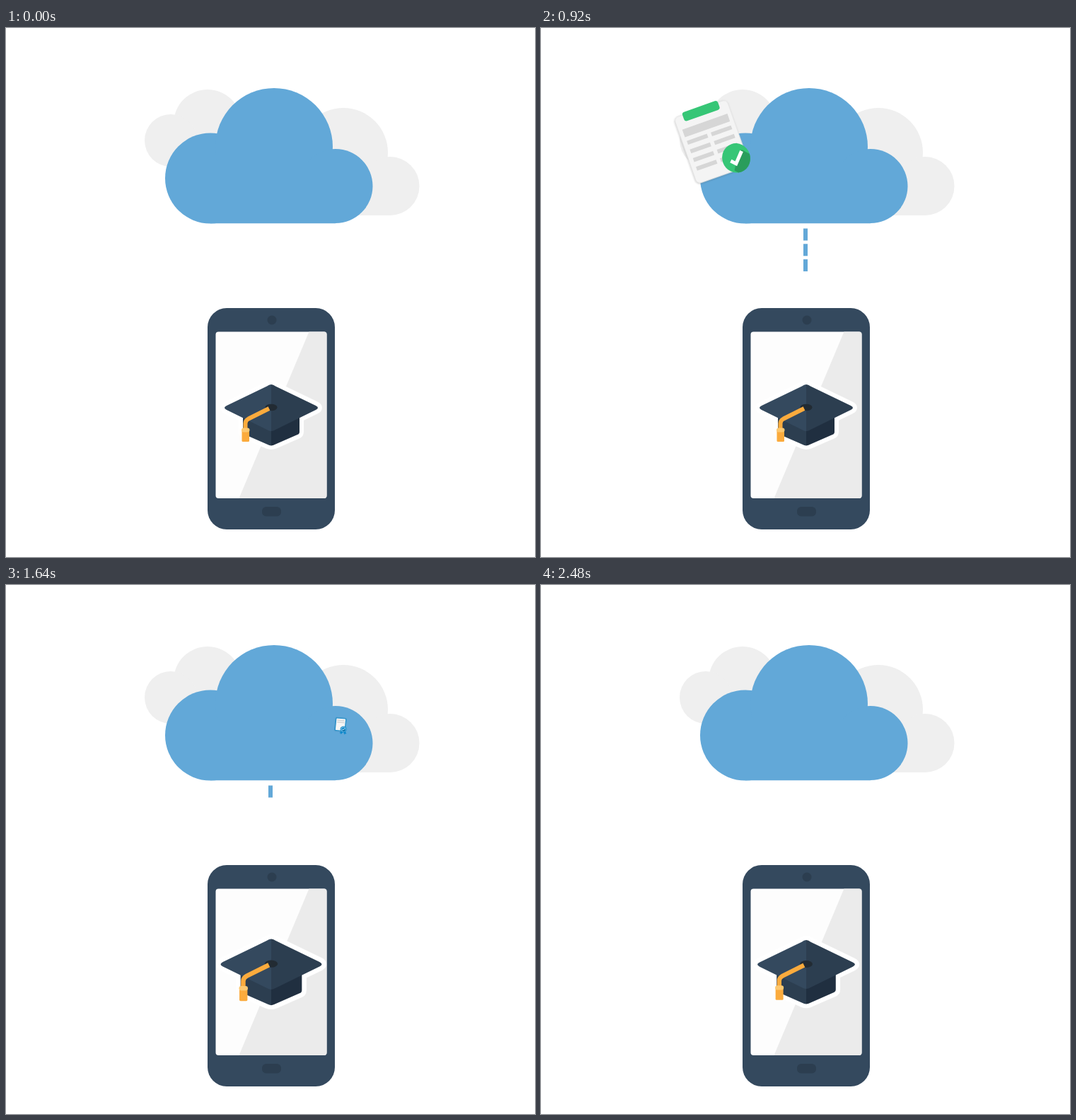
These frames come from a looping animation (748 px wide and 748 px high, 2.52 s). An HTML page:

```html
<!DOCTYPE html>
<html lang="en">
<head>
<meta charset="utf-8">
<title>Mobile learning cloud</title>
<style>
  html, body { margin: 0; height: 100%; overflow: hidden; background: #fff; }
  svg { display: block; width: 100vw; height: 100vh; }
  .paper { fill: #f4f4f4; stroke: #e2e2e2; filter: drop-shadow(-1px 1px 1.5px #0003); }
  .line { fill: #d6d6d6; }
  .check { fill: none; stroke: #fff; stroke-width: 7; }
</style>
</head>
<body>
<svg viewBox="0 0 748 748">
  <defs>
    <rect id="sheet" x="-55" y="-69" width="110" height="138" rx="9"/>
    <rect id="clip" x="-37" y="-73.5" width="74" height="18.5" rx="5"/>
    <ellipse id="disc" cx="34.5" cy="46" rx="27.5" ry="29"/>
    <path id="shade" d="M50 34L62 47A27.5 29 0 0 1 29 74.500L23 68L30 57Z"/>
    <path id="tick" class="check" d="M22.500 48L30.500 56.500L49 36.500"/>
    <path id="capShape" d="M370 506Q375 502.500 380 506L438 534Q444 537 438 540L415 551V571Q415 574 412 575L380 589Q375 591 370 589L338 575Q335 574 335 571V551L312 540Q306 537 312 534Z"/>
  </defs>

  <g fill="#efefef">
    <circle cx="285" cy="135" r="48"/>
    <circle cx="233" cy="159" r="37"/>
    <circle cx="477" cy="176" r="63"/>
    <circle cx="543" cy="223.500" r="41.500"/>
    <path d="M470 200H543V265H470Z"/>
  </g>
  <g fill="#62a8d8">
    <circle cx="289" cy="212.500" r="64"/>
    <circle cx="379" cy="168" r="83"/>
    <circle cx="466" cy="223.500" r="52.500"/>
    <path d="M289 190H466V276.300H289Z"/>
  </g>
  <g id="dashes" fill="#62a8d8"></g>

  <rect x="285" y="396" width="180" height="313" rx="27" fill="#34495e"/>
  <rect x="296.500" y="429.500" width="157" height="235.500" rx="4" fill="#fdfdfd"/>
  <path d="M428.500 429.500H450Q453.500 429.500 453.500 433V661Q453.500 665 450 665H329.500Z" fill="#ebebeb"/>
  <circle cx="376" cy="413" r="6.500" fill="#2c3e50"/>
  <rect x="362" y="677" width="27" height="13.500" rx="6" fill="#2c3e50"/>

  <g id="cap">
    <use href="#capShape" fill="#fff" stroke="#fff" stroke-width="12" stroke-linejoin="round"/>
    <path d="M335 545H375V590.500Q372 590 370 589L338 575Q335 574 335 571Z" fill="#2c3e50"/>
    <path d="M415 545H375V590.500Q378 590 380 589L412 575Q415 574 415 571Z" fill="#202f40"/>
    <path d="M375 504Q372 504 369 506.500L312 534Q306 537 312 540L369 568Q372 570 375 570Z" fill="#34495e"/>
    <path d="M375 504Q378 504 381 506.500L438 534Q444 537 438 540L381 568Q378 570 375 570Z" fill="#2c3e50"/>
    <ellipse cx="375" cy="536.500" rx="8.500" ry="4.800" fill="#222b33"/>
    <path d="M372 538L343 552.500Q338.500 555 338.500 559V568" fill="none" stroke="#fbab3d" stroke-width="6"/>
    <rect x="333.500" y="567" width="10.500" height="18" rx="1.500" fill="#fbab3d"/>
    <rect x="333" y="565.500" width="11.500" height="6" rx="3" fill="#fcc870"/>
  </g>

  <g id="report">
    <use href="#sheet" class="paper"/>
    <use href="#clip" fill="#fbab3d"/>
    <path d="M-42 -40.500H-5V-11H-42Z" fill="#fbab3d"/>
    <path d="M-38 -36H-9V-30L-21 -18L-28 -24L-38 -16Z" fill="#fff"/>
    <path class="line" d="M5 -33H43V-21H5ZM-41 -3H41V8H-41ZM-41 16H41V28H-41ZM-41 36H20V47H-41Z"/>
    <use href="#disc" fill="#fbab3d"/>
    <use href="#shade" fill="#dd9021"/>
    <use href="#tick"/>
  </g>

  <g id="form">
    <use href="#sheet" class="paper"/>
    <use href="#clip" fill="#36c676"/>
    <path class="line" d="M-47 -42H47V-26H-47Z"/>
    <g id="rows" class="line"></g>
    <use href="#disc" fill="#36c676"/>
    <use href="#shade" fill="#2a9d5c"/>
    <use href="#tick"/>
  </g>

  <g id="award">
    <use href="#sheet" class="paper" style="fill:#0d88cb"/>
    <rect x="-46" y="-60" width="92" height="120" rx="4" fill="#f6f6f6"/>
    <path class="line" d="M-38 -47H38V-37H-38ZM-38 -27H38V-17H-38Z"/>
    <path d="M18 62L-3 87L10 87L15 99L34 70L53 99L58 87L71 87L50 62Z" fill="#0d88cb"/>
    <path id="rosette" fill="#0d88cb"/>
    <circle cx="34" cy="46" r="23" fill="#0d88cb" stroke="#fff" stroke-width="3.500"/>
    <path d="M46 39L55 47A21 21 0 0 1 31 67L25 55Z" fill="#086fa8"/>
    <path class="check" d="M23 45L31 53L46 39" style="stroke-width:6"/>
  </g>
</svg>

<script>
const LOOP = 2520, STEP = 40;
const el = id => document.getElementById(id);

// Rows: progress, x offset from the middle, y, scale, tilt
const drop = [
  [0, 0, 200, .03, 0], [.3, 0, 108, 1, 0], [.6, 0, 297, 1, 0],
  [.8, 0, 430, .65, 0], [1, 0, 537, .1, 0]
];
const swing = [
  [0, -94, 204, .03, 3], [.18, -135, 159, .745, 20], [.3, -215, 135, .97, 23],
  [.43, -266, 158, 1, 24], [.51, -229, 225, .89, 24.5], [.684, -166, 368, .8, 25],
  [.8, -110, 450, .55, 20], [1, 0, 537, .1, 0]
];
const flights = [
  { id: "report", start: 0, end: 600, path: drop, side: 1, bump: [600, 780] },
  { id: "form", start: 785, end: 1570, path: swing, side: 1, bump: [1560, 1740] },
  { id: "award", start: 1620, end: 2370, path: swing, side: -1, bump: [2340, 2510] }
];

const box = (x, y, w, h) => `<rect x="${x}" y="${y}" width="${w}" height="${h}"/>`;
const range = n => [...Array(n).keys()];
el("dashes").innerHTML = range(5).map(i => box(371, 283.5 + i * 21.8, 6, 17)).join("");
el("rows").innerHTML = range(4).map(i =>
  box(-46, -18 + i * 18, 42, 8) + box(4, -18 + i * 18, 42, 8)).join("");
el("rosette").setAttribute("d", "M" + range(120).map(i => {
  const a = i * Math.PI / 60, r = 32 + 2 * Math.cos(12 * a);
  return `${(34 + r * Math.cos(a)).toFixed(1)} ${(46 + r * Math.sin(a)).toFixed(1)}`;
}).join("L") + "Z");

// Smooth cubic through the rows of a path
function sample(path, u) {
  let i = 0;
  while (i < path.length - 2 && u > path[i + 1][0]) i++;
  const a = path[i], b = path[i + 1], before = path[i - 1] || a, after = path[i + 2] || b;
  const h = b[0] - a[0], k = (u - a[0]) / h, k2 = k * k, k3 = k2 * k;
  return [1, 2, 3, 4].map(c => {
    const ma = (b[c] - before[c]) / (b[0] - before[0]) * h;
    const mb = (after[c] - a[c]) / (after[0] - a[0]) * h;
    return (2 * k3 - 3 * k2 + 1) * a[c] + (k3 - 2 * k2 + k) * ma
      + (3 * k2 - 2 * k3) * b[c] + (k3 - k2) * mb;
  });
}

function draw(t) {
  let size = 1;
  for (const { id, start, end, path, side, bump } of flights) {
    const u = (t - start) / (end - start), node = el(id);
    const flying = u > 0 && u < 1;
    node.style.display = flying ? "" : "none";
    if (flying) {
      const [x, y, s, tilt] = sample(path, u);
      node.setAttribute("transform",
        `translate(${373.5 + side * x} ${y}) rotate(${-side * tilt}) scale(${s})`);
    }
    const k = (t - bump[0]) / (bump[1] - bump[0]);
    if (k > 0 && k < 1) size += .085 * Math.sin(Math.PI * k);
  }
  el("cap").setAttribute("transform",
    `translate(375 547) scale(${size}) translate(-375 -547)`);
  [...el("dashes").children].forEach((dash, i) => {
    const on = flights.some(f => t >= f.start + 10 + 50 * i && t < f.end - 200 + 40 * i);
    dash.style.display = on ? "" : "none";
  });
}

const origin = performance.now();
function tick() {
  const t = (performance.now() - origin) % LOOP;
  draw(Math.floor(t / STEP) * STEP);
  requestAnimationFrame(tick);
}
tick();
</script>
</body>
</html>
```
